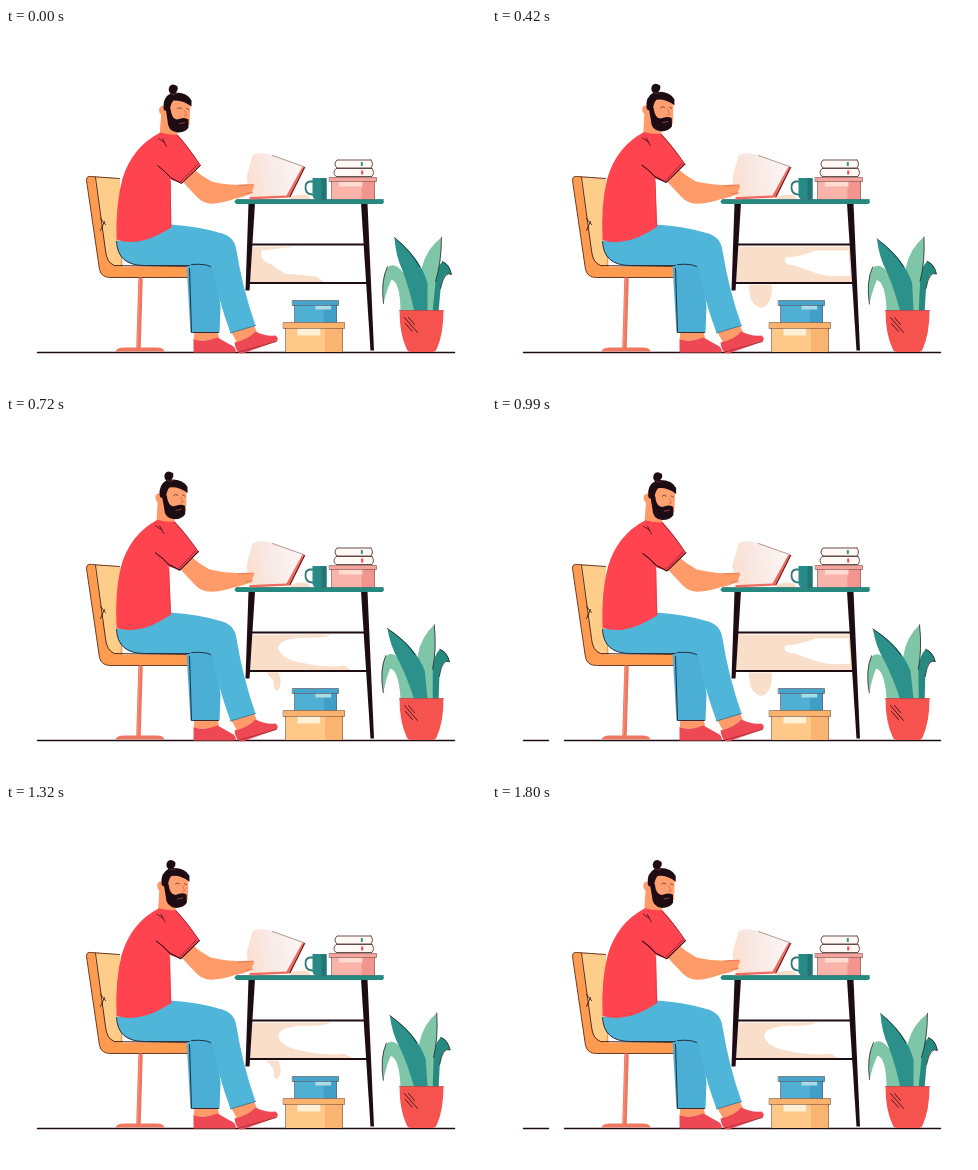
Animation, 480 px wide and 360 px high, one loop 1.83 s. Source, as an HTML page with a canvas:

```html
<!DOCTYPE html>
<html lang="en">
<head>
<meta charset="utf-8">
<style>
html, body { margin: 0; width: 100%; height: 100%; overflow: hidden; background: #fff; }
canvas { display: block; }
</style>
</head>
<body>
<canvas id="stage" width="480" height="360"></canvas>
<script>
const g = document.getElementById('stage').getContext('2d');
const LOOP = 1830, STEP = 30;
const INK = '#1d0c14', RED = '#ff444f', SHOE = '#ef4855', SKIN = '#ff9b69', BLUE = '#4fb5d9',
  ORANGE = '#ff9b4f', SAND = '#fecd8a', TEAL = '#25897f', MINT = '#7fc5a8', CREAM = '#f9dfca';
g.lineCap = g.lineJoin = 'round';
g.translate(.5, .5);

const fill = (d, color) => { g.fillStyle = color; g.fill(new Path2D(d), 'evenodd'); };
const line = (d, color = INK, width = 1) => {
  g.strokeStyle = color;
  g.lineWidth = width;
  g.stroke(new Path2D(d));
};
const rect = (x, y, w, h, color) => { g.fillStyle = color; g.fillRect(x, y, w, h); };
const turned = (x, y, angle, draw) => {
  g.save();
  g.translate(x, y);
  g.rotate(angle);
  g.translate(-x, -y);
  draw();
  g.restore();
};

// Turning points of the upper body: time, sideways shift of the head
const SWAY = [[0, 0], [640, -4.6], [1130, -.8], [1560, -4.4], [2010, 0]];
function headShift(t) {
  const i = SWAY.findIndex(k => k[0] > t);
  const [t0, a] = SWAY[i - 1], [t1, b] = SWAY[i];
  return a + (b - a) * (1 - Math.cos(Math.PI * (t - t0) / (t1 - t0))) / 2;
}

// Flickering patch of wall behind the desk
const FIRST = 'M246 218H290L255 222Q252 232 265 236L278 245L310 248L318 254H243Z';
const SMALL = 'M246 218H286Q272 223 274 231Q278 240 288 246L312 250L316 254H243Z';
const MEDIUM = 'M246 218H324Q318 222 298 221Q270 222 272 233Q275 241 289 245Q320 252 338 249L346 254H243Z';
const LARGE = 'M246 218H357L361 254H243ZM293 229Q309 228 323 222H356L358 247Q337 249 325 245Q310 240 303 237Q289 236 293 229Z';
const DRIP = 'M256 256H279Q281 268 274 277Q266 284 258 270Z';
const DROP = 'M260 256H272Q277 268 271 274Q267 276 267 264Z';
function wall(t) {
  const open = t < 210 || (t >= 1440 && t < 1680);
  const large = (t >= 300 && t < 570) || (t >= 870 && t < 1170);
  fill(t < 210 ? FIRST : open ? SMALL : large ? LARGE : MEDIUM, CREAM);
  if (large) fill(DRIP, CREAM);
  else if (!open && t < 1680) fill(DROP, CREAM);
}

function floor(t) {
  const broken = (t >= 870 && t < 1170) || t >= 1440;
  line(broken ? 'M31 324H56M72 324H448' : 'M31 324H448', INK, 1.5);
}

function chair() {
  fill('M80 151Q80 147 85 148L113 150L116 238H183V249H104Q94 249 93 241Z', ORANGE);
  fill('M88 149L113 150L117 190L114 238L106 236Q100 232 99 222Z', SAND);
  line('M89 149L99 222Q100 234 108 237L183 238', INK, .8);
  line('M113 150L85 148Q80 147 80 152L93 241Q95 249 104 249H183', '#6b3a26', 1);
  line('M94 190L99 196M94 202L98 193', INK, .8);
  line('M134 251L132 319', '#ef7660', 4.5);
  line('M133 251L131 318', '#f9937a', 1);
  fill('M109 323Q110 319 118 319H150Q157 319 158 323Z', '#ef7660');
}

function box(x, y, w, h, lid, body, top, dark, label) {
  rect(x + 2, y + lid, w - 4, h - lid, body);
  rect(x + w * .68, y + lid, w * .32 - 2, h - lid, dark);
  rect(x, y, w, lid, top);
  rect(x + w * label[0], y + lid, w * label[1], label[2], label[3]);
  line(`M${x} ${y}H${x + w}V${y + lid}H${x}ZM${x + 2} ${y + lid}V${y + h}M${x + w - 2} ${y + lid}V${y + h}`,
    'rgba(60, 20, 20, .6)', .7);
}

function book(x, y, w, mark) {
  const r = x + w;
  fill(`M${x + 2} ${y}H${r - 2}Q${r + 1} ${y + 4} ${r - 2} ${y + 8}H${x + 2}Q${x - 2} ${y + 4} ${x + 2} ${y}Z`, '#fff8f4');
  line(`M${r - 2} ${y}H${x + 2}Q${x - 2} ${y + 4} ${x + 2} ${y + 8}H${r - 2}Q${r + 1} ${y + 4} ${r - 2} ${y}`, '#5a3c38', .9);
  rect(x + w * .68, y + 2, 2, 4, mark);
}

function desk() {
  fill('M242 175H248.5L243 262H239Z', INK);
  fill('M354.5 175H361L367.5 322H364Z', INK);
  line('M245 216H360M242 254.5H363', INK, 2);
  fill('M283 171Q288 164 302 167L304 171Z', CREAM);
  line('M306 153H303Q298.5 154 299 160Q300 166 306 166', '#2f7a76', 1.8);
  fill('M306 149.5H320V171H309Q306 170 306 166Z', '#278a86');
  rect(315, 150, 5, 21, '#237474');
  book(328.5, 131.5, 38, '#2f9b86');
  book(327.5, 140, 40, RED);
  box(323, 149, 47, 22, 4, '#f9b3aa', '#f6a39b', '#f1958e', [.2, .5, 5, '#ffdbd0']);
  fill('M230 171H376Q379 173 376 175.5H230Q226 173 230 171Z', TEAL);
  line('M230 171H377', '#1f625f', .6);
}

function laptop() {
  const shade = g.createLinearGradient(240, 150, 296, 142);
  shade.addColorStop(0, '#fadfd0');
  shade.addColorStop(.5, '#f9ebe7');
  shade.addColorStop(1, '#fcf6f5');
  fill('M246 127Q253 122 267 127L297 138L281 168H243L240 149Z', shade);
  line('M266 127L297 138', '#a48079', .8);
  fill('M296 138L299 138.5L284 169L243 171V168.5L280 167Z', '#ef6a5f');
  line('M298 139L283.5 168', INK, .8);
}

function legs() {
  fill('M188 302H211L213 312H187Z', SKIN);
  fill('M224 302L247 296L251 305L231 315Z', SKIN);
  fill('M187 311Q199 314 211 309L227 318Q230 321 229 324H187Z', SHOE);
  fill('M228 314Q242 311 249 303Q258 308 269 307Q273 310 270 313L236 325Q229 325 228 314Z', SHOE);
  line('M231 324L270 313', '#7a242e', .6);
  fill('M180 236L184 304H213L214 278L209 236Z', '#4aaed5');
  line('M183 240L185 304H212', INK, .8);
  fill('M110 212Q136 214 164 196Q192 198 212 204Q228 207 230 222Q236 260 249 297L224 304.5Q211 269 205 237H137Q110 237 110 212Z', BLUE);
  line('M110 213Q111 237 138 237H183M185 236Q199 235 204 238', INK, .8);
  line('M224 304.5L249 297', '#2c718b', .8);
}

function head() {
  fill('M155 82L153 107Q163 111 171 106L169 91Z', SKIN);
  fill('M158 72Q174 66 184 76L183 96Q174 103 160 94Z', '#ffa071');
  fill('M157 77Q151 78 153 84Q155 88 161 88Z', SKIN);
  fill('M157 80Q156 69 164 65Q161 62 163 58Q166 54 171 58Q172 62 169 64Q181 64 185 72V78Q176 71 167 72Q164 75 163 83L158 82Z', INK);
  fill('M159 79L164 80Q165 91 171 91Q178 88 182 91V99Q179 104 171 104Q161 103 161 92Z', INK);
  line('M173 95Q176 95 178 94', '#a8504a', .8);
  line('M171 80Q173 78 175 80M180 80L182 81', '#6b2f29', .8);
  line('M178 82L180 87L178 87.5', '#d96551', .8);
  line('M165 65Q167 67 171 65', '#70493e', .6);
}

function arm(shift, t) {
  const e = shift * .45, bob = .6 * Math.sin(t / LOOP * 12 * Math.PI);
  const h = 156 + bob;
  fill(`M${166 + e} 144L${184 + e} 138Q${194 + e} 147 ${205 + e} 153Q222 157 234 ${h}Q244 ${h - 1} 248 ${h + 1}`
    + `Q246 ${h + 4} 245 ${h + 9}Q236 ${h + 13} 229 ${h + 14}Q212 176 ${203 + e} 175Q${196 + e} 174 ${191 + e} 169L${176 + e} 153Z`, SKIN);
  line(`M232 ${h + 1}Q241 ${h + 1} 247 ${h}M239 ${h + 9}L246 ${h + 8}`, '#d86c4e', .7);
}

function torso() {
  fill('M154 104Q164 107 171 106Q182 118 194 137L175 155L164 151L165 199Q150 208 140 211Q123 216 110 211Q109 176 116 150Q126 118 154 104Z', RED);
  line('M151 137Q158 142 164 149L175 155L194 137', INK, 1);
  line('M174 153Q182 146 191 136M171 107Q182 119 194 137', '#7a242e', .8);
  line('M152 110L158 114M156 110L160 118', INK, .7);
  line('M164 153V198', '#d93341', .7);
}

function plant(t) {
  const lean = -(1 - Math.cos(2 * Math.PI * t / LOOP)) / 2;
  const leaf = (x, amount, d, color, vein) => turned(x, 282, lean * amount, () => {
    fill(d, color);
    line(vein, INK, .7);
  });
  leaf(407, .045, 'M377 275Q374 253 380 240Q386 233 394 241Q405 252 409 284H394Q394 254 385 251Q381 259 377 275Z', MINT,
    'M377 275Q374 252 381 238');
  leaf(430, .06, 'M426 284Q424 244 436 233Q443 235 445 246Q437 242 434 261L432 284Z', TEAL,
    'M436 233Q443 236 445 246Q438 242 434 260');
  leaf(424, .11, 'M415 284Q406 230 435 209Q435 235 429 254L426 284Z', MINT, 'M435 209Q435 234 429 253');
  leaf(415, .11, 'M388 209Q414 229 421 255V284H408Q403 260 396 242Q389 227 388 209Z', '#2b918a',
    'M388 209Q405 223 413 238');
  fill('M393 282H437Q437 306 430 321Q429 323.5 425 323.5H405Q401 323.5 400 320Q393 305 393 282Z', '#f6524e');
  line('M393 282H437', '#b8403f', .7);
  line('M398 289L411 304M402 289L408 296M399 295L406 303', INK, .8);
}

function draw(t) {
  const shift = headShift(t), lean = shift / 148;
  g.clearRect(-1, -1, 482, 362);
  wall(t);
  floor(t);
  chair();
  desk();
  laptop();
  box(286, 272, 46, 22, 5, '#50b0d3', '#45a4cb', '#419fc7', [.5, .34, 4, '#a9dde5']);
  box(277, 294, 61, 29.5, 6, '#fdc888', '#f9b36c', '#f8b470', [.23, .37, 7, '#fff0d6']);
  legs();
  turned(130, 208, lean, head);
  arm(shift, t);
  turned(130, 208, lean, torso);
  plant(t);
}

function tick() {
  const t = performance.now() % LOOP;
  draw(Math.floor(t / STEP) * STEP);
  requestAnimationFrame(tick);
}
tick();
</script>
</body>
</html>
```
